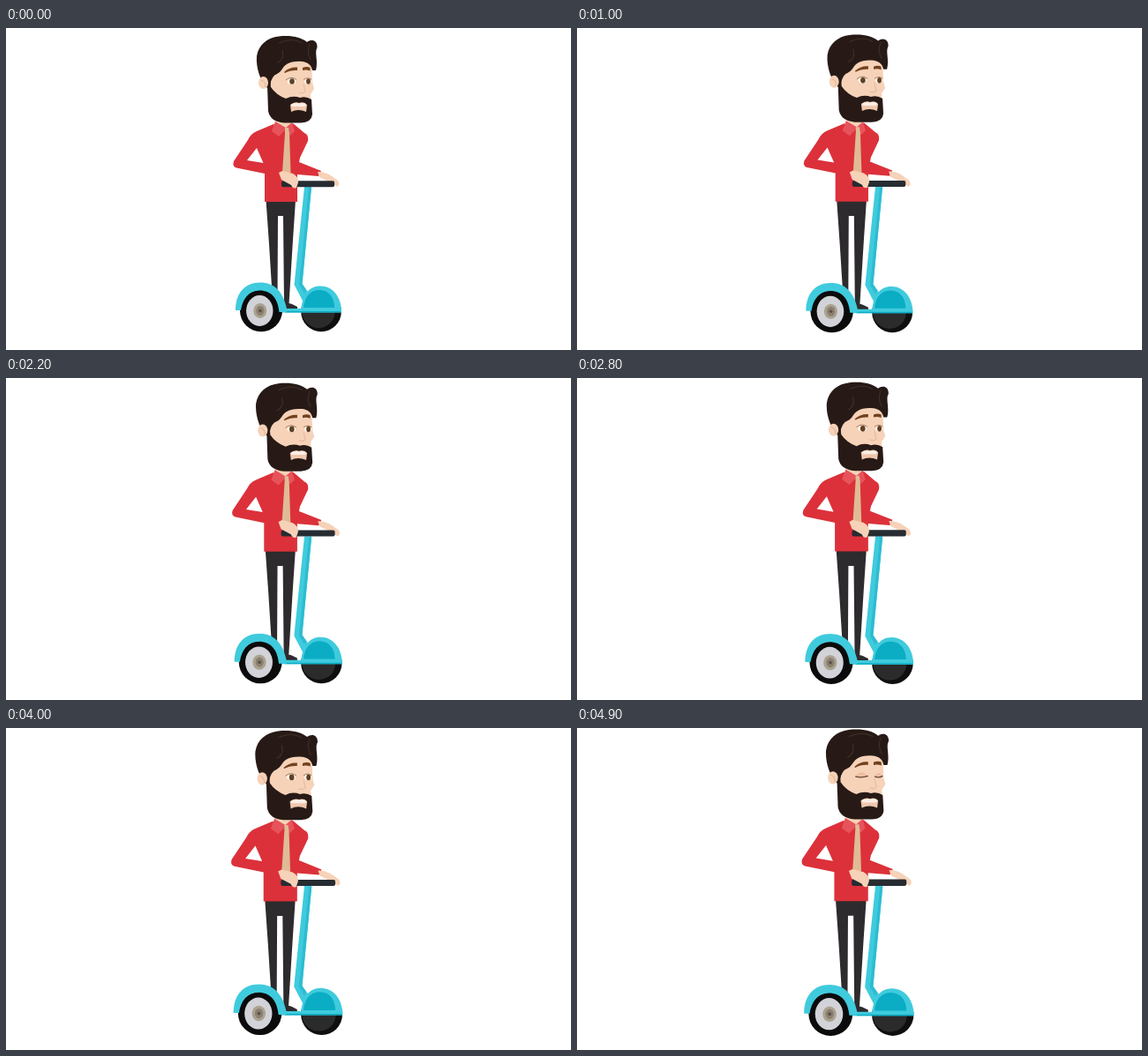
Animation of 640x365 px, one loop 5000 ms. Source, as an HTML page:

```html
<!DOCTYPE html>
<html lang="en">
<head>
<meta charset="utf-8">
<title>Scooter rider</title>
<style>
html, body { margin: 0; width: 100%; height: 100%; overflow: hidden; background: #fff; }
svg { display: block; width: 100%; height: 100%; }
.red { fill: #dc313a; }
.skin { fill: #f6d2b8; }
.hair { fill: #271a16; }
.dark { fill: #2d2b2d; }
.cyan { fill: #3fcbdd; }
.teal { fill: #0badc4; }
</style>
</head>
<body>
<svg viewBox="0 0 640 365">
<g id="rider">
  <!-- legs and shoes -->
  <path class="dark" d="M294.500 195H328L325 240 320.500 313H315L314 213H308L307.500 309H302L298 245Z"/>
  <path class="dark" d="M315 318V313Q319 311 324 313L330 316V319H315Z"/>

  <!-- far wheel -->
  <circle cx="357" cy="321.500" r="22.800" fill="#0f0f10"/>
  <ellipse cx="354" cy="322" rx="18.500" ry="18" fill="#2b2b2c"/>
  <path class="cyan" d="M334 322C335 303 343 292.500 356 292.500C371 292.500 380 306 380 322Z"/>
  <path class="teal" d="M337 317C338 304 345 297 355 297C366 297 372 306 372 317Z"/>

  <!-- steering column and deck -->
  <path class="cyan" d="M338 180H346L335.500 290 342 299 337 311 326.500 291Z"/>
  <path d="M343 181H346L335.500 290 340 297 338 301 332 291Z" fill="#2dbcd1"/>
  <path class="cyan" d="M312 318H380V322.500H309Z"/>
  <path class="teal" d="M316 321H379V322.500H316Z"/>

  <!-- near wheel -->
  <ellipse cx="289" cy="320.500" rx="24" ry="23.800" fill="#0b0b0c"/>
  <ellipse cx="287.300" cy="320.500" rx="15.200" ry="17.500" fill="#d2d3d8"/>
  <ellipse cx="287.800" cy="320.500" rx="7.500" ry="8.500" fill="#aaa18f"/>
  <ellipse cx="288" cy="320.500" rx="4.500" ry="5.500" fill="#8b8070"/>
  <circle cx="288" cy="320.500" r="1.800" fill="#5b5145"/>
  <path class="cyan" d="M260 320C260 301 270 288.500 288 288.500C304 288.500 314 299 318 318V322H309.500C308 307 301 297.500 287 297.500C275 297.500 268 307 266 320Z"/>

  <!-- shirt -->
  <path class="skin" d="M305 98H323V113L317 118 305 111Z"/>
  <path class="red" d="M303 109L284 117Q277 120 274 127L258 151Q256 157 261 158.500L293 165V197H330V166L354 168 357 162 332 152 333 147 342 128Q343 121 338 119L325 108 317 116ZM284 136L291.500 153 273 150Z" fill-rule="evenodd"/>
  <path d="M305 106L301 117 309 123 317 115 322 122 327 117 324 107 317 113Z" fill="#e7535b"/>
  <path d="M316 113H320L321 119 322.500 164 318 169 313 164 316 119Z" fill="#dfbc96"/>

  <!-- hands and handlebar -->
  <path class="skin" d="M353 163Q362 163 369 168L376 173Q379 178 375 180L369 176 355 169Z"/>
  <rect x="312" y="173.200" width="60" height="7" rx="2" fill="#262c31"/>
  <path class="skin" d="M309 164L313 162 325 165Q332 169 331 175L329 181Q325 183 323 178L312 172Z"/>

  <!-- head -->
  <path class="skin" d="M298 36H346L347 62 349 69 345 75 346 92 320 97 298 76Z"/>
  <path class="hair" d="M299 55L300 67Q306 76 317 80Q325 76 333 79Q340 77 346 81L347 98Q346 107 334 107.500H315Q299 106 297 94L296 65Z"/>
  <path d="M322 87Q327 83 332 85Q338 83 341 87L340 95Q331 91 323 95Z" fill="#efc7ad"/>
  <path d="M323 86.500Q328 84 332 85.500 337 84 340 86.500L339 89H324Z" fill="#fbeee5"/>
  <path class="hair" d="M296 68C288 60 283 45 284 32C286 19 296 11 309 9.500C322 8 334 10 341 16C346 12 353 14 352.500 22C349 28 354 37 351 48H347C346 42 342 39 336 38Q325 37 318 41C313 44 313 49 307 52Q301 54 299 65Z"/>
  <g fill="none" stroke="#41302a" stroke-width="1">
    <path d="M309 17Q324 10 335 17"/>
    <path d="M307 40Q316 36 313 25"/>
    <path d="M344 18Q340 27 345 36"/>
  </g>
  <ellipse cx="291.500" cy="62" rx="5.500" ry="7" class="skin"/>
  <path d="M289 59Q294 60 294 67" fill="none" stroke="#e5b497"/>

  <!-- face -->
  <path d="M315 50Q321 44 330 44.500V48Q322 47.500 316 51ZM336 45Q341 43 344.500 45V48.500Q340 47 336 48Z" fill="#71421f"/>
  <path d="M337 63L339 72Q337 75 332 73" fill="none" stroke="#e8b89b"/>
  <g id="eyes">
    <ellipse cx="323.500" cy="60.500" rx="4.800" ry="3.300" fill="#fff"/>
    <ellipse cx="342" cy="60.500" rx="3.800" ry="3.300" fill="#fff"/>
    <ellipse cx="324" cy="60.500" rx="2.800" ry="3.300" fill="#644021"/>
    <ellipse cx="342.500" cy="60.500" rx="2.400" ry="3.300" fill="#644021"/>
    <path d="M317 59Q323 54 329 58.500M337 58.500Q342 55 346 58.500" fill="none" stroke="#8d6751" stroke-width=".8"/>
  </g>
  <g id="lids" visibility="hidden">
    <path d="M316 60.500Q323 52 330 60.500ZM337 60.500Q342 53 346 60.500Z" fill="#edbea2"/>
    <path d="M316 60.500Q323 62.500 330 60M337 60.500Q342 62.500 346 60" fill="none" stroke="#654436" stroke-width="1.200"/>
  </g>
</g>
</svg>
<script>
const rider = document.getElementById("rider");
const eyes = document.getElementById("eyes");
const lids = document.getElementById("lids");
const LOOP = 5000, STEP = 100, CX = 337, CY = 217;

function draw(now) {
  const t = Math.floor((now % LOOP) / STEP) * STEP;
  const zoom = 1 + 0.036 * t / 4900;
  rider.setAttribute("transform", `translate(${CX} ${CY}) scale(${zoom}) translate(${-CX} ${-CY})`);

  // The eyes narrow for one step, then shut until the loop restarts.
  const shut = t >= 4900;
  const open = t >= 4800 ? 0.5 : 1;
  eyes.setAttribute("transform", `translate(0 ${60.5 * (1 - open)}) scale(1 ${open})`);
  eyes.setAttribute("visibility", shut ? "hidden" : "visible");
  lids.setAttribute("visibility", shut ? "visible" : "hidden");
}

const start = performance.now();
function tick() {
  draw(performance.now() - start);
  requestAnimationFrame(tick);
}
tick();
</script>
</body>
</html>
```
